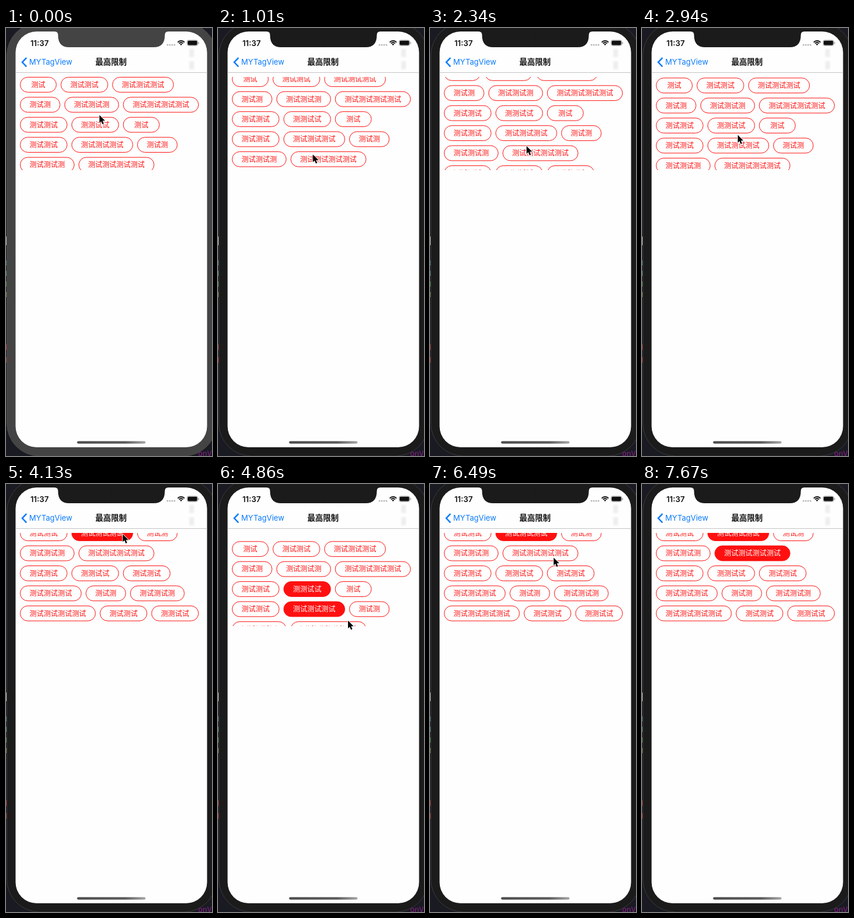
Write an HTML page with a canvas that moves like this. It is 355x735 px and loops after 8220 ms.

```html
<!DOCTYPE html>
<html lang="zh">
<head>
<meta charset="utf-8">
<title>MYTagView</title>
<style>
html, body { margin: 0; width: 100%; height: 100%; overflow: hidden; background: #17171c; }
canvas { display: block; width: 355px; height: 735px; }
</style>
</head>
<body>
<canvas id="stage"></canvas>
<script>
const W = 355, H = 735, LOOP = 8220, STEP = 148.1, MAX_SCROLL = 116;
const RED = '#ff1010', BLUE = '#0b7bfc', INK = '#111';
const LATIN = 'Inter, "Noto Sans", sans-serif';
const HAN = '"Noto Sans CJK SC", "Noto Sans CJK", "Noto Sans CJK JP", sans-serif';

const canvas = document.getElementById('stage');
const c = canvas.getContext('2d');
const dpr = window.devicePixelRatio || 1;
canvas.width = W * dpr;
canvas.height = H * dpr;

// Turning points of the pointer: time, x, y
const turns = [
  [0, 161, 149], [150, 161, 149], [860, 163, 228], [1590, 168, 115], [1900, 168, 113],
  [2500, 166, 222], [2915, 165, 183], [3390, 170, 202], [4000, 200, 78],
  [4850, 224, 234], [5750, 219, 230], [6440, 213, 126], [6780, 214, 124],
  [6925, 227, 229], [7660, 300, 740]
];

// The same phrases repeat; the last round leaves out the first one
const phrase = n => '测试'.repeat(4).slice(0, n);
const round = [2, 4, 6, 3, 5, 8, 4].map(phrase).concat('测测试试');
const labels = [...round, ...round, ...round.slice(1)];
const taps = { 7: 3070, 10: 3370, 13: 6630 };

function ease(t, from, to) {
  const p = Math.min(1, Math.max(0, (t - from) / (to - from)));
  return p * p * (3 - 2 * p);
}

const bounce = (t, at, size) => size * Math.exp(-(((t - at) / 195) ** 2));

// Three swipes up, two back down, each return overshooting the top
function scrollAt(t) {
  const pulled = ease(t, 860, 1670) - ease(t, 1900, 2500)
    + ease(t, 3500, 4000) - ease(t, 4150, 4720) + ease(t, 5750, 6440);
  return MAX_SCROLL * pulled - bounce(t, 2640, 12) - bounce(t, 4850, 14.3);
}

function pointerAt(t) {
  const i = turns.findIndex(k => k[0] > t);
  if (i < 0) return [0, H];
  const [t0, x0, y0] = turns[i - 1], [t1, x1, y1] = turns[i];
  const e = ease(t, t0, t1);
  return [x0 + (x1 - x0) * e, y0 + (y1 - y0) * e];
}

function box(x, y, w, h, r, fill, stroke, line = 1) {
  c.beginPath();
  c.roundRect(x, y, w, h, r);
  if (fill) {
    c.fillStyle = fill;
    c.fill();
  }
  if (stroke) {
    c.strokeStyle = stroke;
    c.lineWidth = line;
    c.stroke();
  }
}

function text(s, x, y, font, color, align = 'left') {
  c.font = font;
  c.fillStyle = color;
  c.textAlign = align;
  c.fillText(s, x, y);
}

function backdrop() {
  c.fillStyle = '#191a22';
  c.fillRect(0, 0, W, H);
  // Slivers of code at the left edge
  box(0, 358, 1.5, 15, 0, '#b8b8b8');
  for (let i = 0; i < 4; i++) box(0, 399 + i * 18, 1.5, 9, 0, `hsl(${195 - i * 35} 40% 38%)`);
  for (let i = 0; i < 2; i++) box(0, 543 + i * 22, 1.5, 10, 0, '#ad2b2b');
  text('onV', 331, 735, '13px "Noto Sans Mono", monospace', '#8a1f8a');
}

function phone(lit) {
  const body = lit ? '#444444' : '#1b1b1b';
  box(1.5, -9, 361, 744, 56, body, lit ? '#4c4c4c' : '#3b3b3d');
  box(16.5, 6, 330, 714, 36, '#fefefe');

  // Notch, drawn as one half and its mirror
  c.fillStyle = body;
  for (const side of [-1, 1]) {
    const at = d => 181.7 + side * d;
    c.beginPath();
    c.moveTo(at(-0.5), 5);
    c.lineTo(at(98), 5);
    c.lineTo(at(98), 6);
    c.quadraticCurveTo(at(92), 6, at(92), 12);
    c.bezierCurveTo(at(92), 26, at(86), 33, at(73), 33);
    c.lineTo(at(-0.5), 33);
    c.fill();
  }

  const shade = c.createLinearGradient(123, 0, 241, 0);
  shade.addColorStop(0, '#4c4c4c');
  shade.addColorStop(0.7, '#5a5a5a');
  shade.addColorStop(1, '#a8a8a8');
  box(122.5, 709.5, 118, 4.2, 2.1, shade);
}

function statusBar() {
  text('11:37', 42, 30.5, '600 13.3px ' + LATIN, INK);
  for (let i = 0; i < 4; i++) box(276.8 + i * 4, 27.5, 3, 3, 1.5, '#b9b9b9');

  c.strokeStyle = c.fillStyle = INK;
  c.lineWidth = 1.8;
  const fan = r => c.arc(301.7, 30, r, -Math.PI * 0.76, -Math.PI * 0.24);
  for (const r of [8, 5]) {
    c.beginPath();
    fan(r);
    c.stroke();
  }
  c.beginPath();
  c.moveTo(301.7, 30);
  fan(2.8);
  c.fill();

  box(312, 20.8, 18.5, 9.6, 2.8, null, '#999', 0.8);
  box(313, 21.8, 16.5, 7.6, 1.8, INK);
  box(331.3, 24, 1.2, 3.4, 0, '#999');
}

function navBar() {
  // Soft smudges below the battery
  c.save();
  c.filter = 'blur(1.5px)';
  for (const y of [36, 57]) box(316, y, 8, 14, 0, '#eeeeee');
  c.restore();

  box(16.5, 76, 330, 1, 0, '#c4c4c4');
  c.beginPath();
  c.moveTo(35.3, 51.2);
  c.lineTo(28, 58.8);
  c.lineTo(35.3, 66.4);
  c.strokeStyle = BLUE;
  c.lineWidth = 2.5;
  c.stroke();
  text('MYTagView', 40, 63.4, '13.1px ' + LATIN, BLUE);
  text('最高限制', 181, 63.3, 'bold 13.5px ' + HAN, INK, 'center');
}

// Pills flow from the left and wrap at the margin
function tags(t) {
  const left = 24.5, gap = 8;
  let x = left, y = 84.5 - scrollAt(t);
  c.save();
  c.beginPath();
  c.rect(16.5, 84, 330, 160);
  c.clip();
  labels.forEach((label, i) => {
    const w = Math.max(62.2, 32 + 12.2 * label.length);
    if (x + w > 333) {
      x = left;
      y += 34.4;
    }
    const on = t >= taps[i];
    box(x, y, w, 25.8, 12.9, on && RED, RED);
    text(label, x + w / 2, y + 17.3, '12.2px ' + HAN, on ? '#fff' : RED, 'center');
    x += w + gap;
  });
  c.restore();
}

function pointer(x, y) {
  c.save();
  c.translate(x, y + 0.6);
  c.scale(0.92, 0.92);
  c.beginPath();
  c.moveTo(0, 0);
  [[0, 14.5], [3.3, 11.5], [5.6, 17], [8.2, 15.9], [5.9, 10.6], [10.5, 10.4]]
    .forEach(p => c.lineTo(...p));
  c.closePath();
  c.strokeStyle = '#fff';
  c.lineWidth = 1.8;
  c.lineJoin = 'round';
  c.stroke();
  c.fillStyle = '#050505';
  c.fill();
  c.restore();
}

// The picture advances in even steps and rests at the end
function snap(t) {
  if (t < 150) return 0;
  if (t >= 7668) return 7670;
  return Math.max(150, 1300 + Math.floor((t - 1300) / STEP) * STEP);
}

function draw(now) {
  const t = snap(now % LOOP);
  const [x, y] = pointerAt(t);
  c.setTransform(dpr, 0, 0, dpr, 0, 0);
  backdrop();
  phone(t < 150);
  statusBar();
  navBar();
  tags(t);
  if (y < H) pointer(x, y);
}

let start = null;
function tick(now) {
  if (start === null) start = now;
  draw(now - start);
  requestAnimationFrame(tick);
}
draw(0);
requestAnimationFrame(tick);
</script>
</body>
</html>
```
